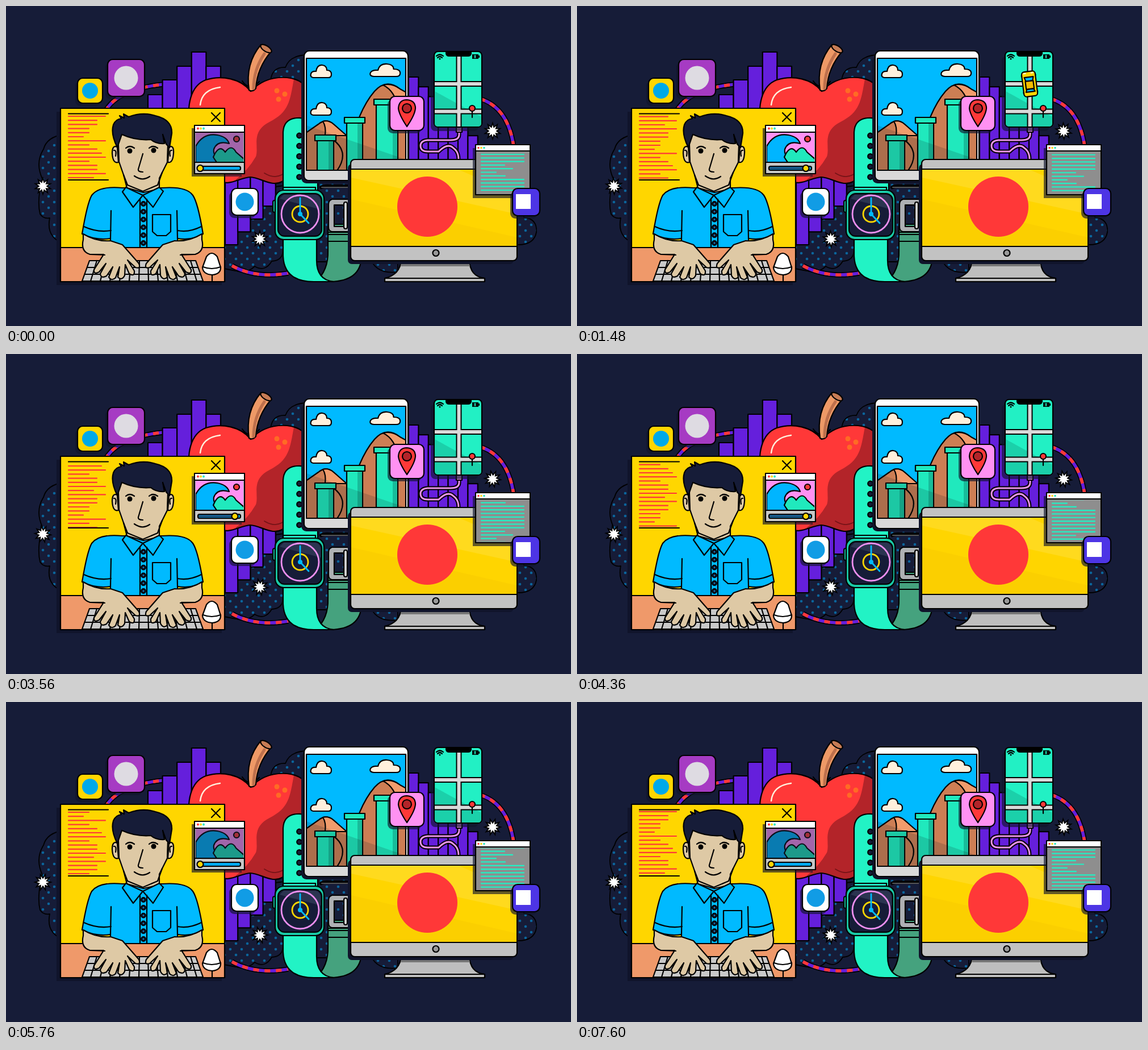
An HTML page for the animation above (7680 ms loop, 995 by 563 pixels).

```html
<!DOCTYPE html>
<html lang="en">
<head>
<meta charset="utf-8">
<title>Desk and devices</title>
<style>
html, body { margin: 0; width: 100%; height: 100%; overflow: hidden; background: #161c38; }
svg { display: block; width: 995px; height: 563px; stroke-linejoin: round; stroke-linecap: round; }
.o { stroke: #000; stroke-width: 2.2; }
.n { fill: none; }
.sh { fill: #10142b; }
</style>
</head>
<body>
<svg viewBox="0 0 995 563" xmlns="http://www.w3.org/2000/svg">
<defs>
  <pattern id="dots" width="20" height="20" patternUnits="userSpaceOnUse">
    <rect width="20" height="20" fill="#161c38"/>
    <circle cx="5" cy="5" r="2.3" fill="#0b659c"/><circle cx="15" cy="15" r="2.3" fill="#0b659c"/>
  </pattern>
  <clipPath id="tabletClip"><rect x="529" y="92" width="175" height="197"/></clipPath>
  <clipPath id="phoneClip"><rect x="755" y="81" width="82" height="131" rx="5"/></clipPath>
  <clipPath id="videoClip"><rect x="334" y="222" width="84" height="53"/></clipPath>
  <clipPath id="codeClip"><rect x="105" y="191" width="78" height="114"/></clipPath>
  <clipPath id="termClip"><rect x="829" y="257" width="92" height="73"/></clipPath>
  <clipPath id="appleClip"><path id="appleShape" d="M431 150C414 128 380 121 352 130C325 140 317 176 325 211C335 249 352 292 375 307C393 318 411 302 430 301C449 302 468 319 486 309C512 294 539 243 544 201C548 157 529 129 495 126C466 124 445 135 431 150Z"/></clipPath>
</defs>
<rect width="995" height="563" fill="#161c38"/>

<!-- clouds -->
<g fill="url(#dots)" stroke="#000" stroke-width="1.8">
  <path d="M102 226Q72 230 66 252Q51 276 64 304Q54 342 60 366Q66 375 77 373Q70 407 102 418Z"/>
  <path d="M384 330L610 300V450H500L488 428Q488 448 468 449Q456 469 438 458Q424 472 405 466L384 462Z"/>
  <path d="M466 132Q468 107 492 108Q500 86 532 86V210H500Z"/>
  <path d="M880 350Q913 358 912 372Q936 374 934 398Q930 420 902 420L880 410Z"/>
  <path d="M640 440Q650 473 690 468V440Z"/>
</g>
<g id="ring" fill="none" stroke-linecap="butt"></g>
<g id="bars" class="o" fill="#651fdc"></g>

<!-- apple -->
<use href="#appleShape" fill="#ff3838"/>
<g clip-path="url(#appleClip)">
  <path d="M550 122H508C500 168 499 186 464 204C430 221 446 248 440 265Q426 289 404 306L433 325H560Z" fill="#b32429"/>
  <path d="M455 294Q479 309 497 287" fill="none" stroke="#751317" stroke-width="1.8"/>
</g>
<use href="#appleShape" fill="none" class="o"/>
<path d="M416 132Q429 151 446 133" class="n o"/>
<path d="M428 148Q421 101 449 68L467 80Q442 109 440 145Q434 152 428 148Z" fill="#ee9966" class="o"/>
<path d="M455 84Q436 112 436 145" class="n" stroke="#be704c" stroke-width="5"/>
<ellipse cx="458" cy="75" rx="11" ry="5" transform="rotate(33 458 75)" fill="#c77c55" class="o"/>
<path d="M342 174Q345 147 377 143" class="n" stroke="#fff0dc" stroke-width="2.5"/>
<g fill="#ff6b24"><circle cx="477" cy="149" r="4.5"/><circle cx="491" cy="155" r="4.5"/><circle cx="480" cy="164" r="4.5"/></g>

<!-- watch strap, upper -->
<path d="M488 326V222Q489 199 512 197Q543 195 549 222V326Z" fill="#22f3c5" class="o"/>
<g id="holes" fill="#161c38" class="o"></g>

<!-- tablet -->
<rect x="520" y="88" width="185" height="224" rx="9" class="sh"/>
<rect x="525" y="79" width="183" height="228" rx="9" fill="#fff" class="o"/>
<path d="M526 289H707V298Q707 306 699 306H534Q526 306 526 298Z" fill="#d9d9d9"/>
<g clip-path="url(#tabletClip)">
  <rect x="529" y="92" width="175" height="197" fill="#00baff"/>
  <path d="M598 292Q612 193 649 150Q670 127 694 146L720 175V292Z" fill="#cd7e54" class="o"/>
  <path d="M664 139Q686 150 690 180L720 190V160L694 146Q680 135 664 139Z" fill="#f19c6c" class="o"/>
  <path d="M510 300V236L550 208Q563 197 577 208L612 240V300Z" fill="#cd7e54" class="o"/>
  <path d="M558 203Q564 212 562 228H600L577 208Q568 200 558 203Z" fill="#f19c6c" class="o"/>
  <path d="M577 236Q606 258 582 291" class="n o"/>
  <g id="pipes" class="o" fill="#20e9bd"></g>
  <path d="M529 210L704 270V290H529Z" fill="#081b24" opacity=".16"/>
  <g id="clouds" fill="#fff0dc" class="o"></g>
</g>
<rect x="529" y="92" width="175" height="197" class="n o"/>

<!-- strap, lower -->
<path d="M567 384H626V441Q625 484 571 485H545Q568 466 567 430Z" fill="#45a27e" class="o"/>
<path d="M567 398H626M567 402H626M567 414H626" class="n o"/>
<path d="M555 319Q560 316 570 317H612" class="n" stroke="#000" stroke-width="6"/>
<path d="M556 319H612" class="n" stroke="#555" stroke-width="2"/>
<path d="M574 340H613V397H574Q568 396 568 389V349Q568 342 574 340ZM578 350V388H604V350Z" fill="#aeb0b3" fill-rule="evenodd" class="o"/>
<rect x="595" y="345" width="6" height="47" rx="3" fill="#d4d4d4" class="o"/>
<path d="M488 410H547V445Q546 482 577 485H544Q490 486 488 440Z" fill="#22f3c5" class="o"/>
<rect x="470" y="342" width="7" height="21" rx="3" fill="#19cda9" class="o"/>
<rect x="474" y="324" width="86" height="87" rx="15" fill="#1ac9a7" class="o"/>
<path d="M488 324H545V319H488Z" fill="#22f3c5" class="o"/>
<rect x="479" y="330" width="77" height="75" rx="12" fill="#161c38" class="o"/>
<path d="M489 332H545Q554 334 554 344V358L482 339Z" fill="#2b3450"/>
<g fill="none" stroke-width="2.8">
  <circle cx="518" cy="366" r="33" stroke="#ed8ff0"/><circle cx="518" cy="366" r="14" stroke="#ffd600"/>
  <path d="M518 338V366L533 382" stroke="#00baff"/>
</g>
<circle cx="518" cy="366" r="4" fill="#00baff"/>

<!-- cable -->
<g fill="none">
  <path id="cable" d="M798 214V226Q798 236 783 236H742Q730 237 730 246Q730 256 743 256H762Q778 240 788 250Q797 256 797 270" stroke="#000" stroke-width="7"/>
  <path id="cableCore" stroke="#eb96e7" stroke-width="3"/>
</g>
<rect x="793" y="211" width="10" height="11" fill="#eb96e7" class="o"/>

<!-- monitor -->
<path d="M696 447H816Q817 476 843 479V485H667V479Q694 473 696 447Z" fill="#bebebe" class="o"/>
<path d="M697 449H815L817 458H695Z" fill="#777"/>
<path d="M667 479H843" class="o"/>
<rect x="602" y="278" width="292" height="176" rx="7" class="sh"/>
<rect x="607" y="270" width="293" height="178" rx="7" fill="#c2c2c2" class="o"/>
<rect x="608" y="287" width="291" height="136" fill="#ffd500"/>
<path d="M608 287H795L899 332V366L608 302Z" fill="#ffe04b" opacity=".4"/>
<path d="M608 340L899 407V423H608Z" fill="#edbd00" opacity=".25"/>
<path d="M608 287H899M608 423H899" class="o"/>
<circle cx="757" cy="434.500" r="5.500" fill="#999" class="o"/>
<circle cx="742" cy="353" r="53" fill="#ff3838"/>

<!-- video call -->
<rect x="89" y="186" width="291" height="305" class="sh"/>
<rect x="96" y="180" width="289" height="305" fill="#ffd600" class="o"/>
<path d="M96 425H385V485H96Z" fill="#ef996a" class="o"/>
<path d="M362 188L377 203M377 188L362 203" class="o"/>
<path d="M110 189.500H180M110 306H180" class="o"/>
<g id="code" clip-path="url(#codeClip)" stroke="#ff3838" stroke-width="2.2"></g>

<path d="M205 320Q164 316 151 333Q143 347 134 401Q158 413 184 409V425H302V409Q329 413 347 401Q338 346 329 333Q318 317 275 320Z" fill="#00baff" class="o"/>
<path d="M184 409L185 360M302 409L301 360M137 388Q161 399 185 395M344 388Q322 399 302 395" class="n o"/>
<path d="M196 248Q187 244 187 259Q188 278 198 275ZM287 248Q296 244 295 259Q294 277 285 275Z" fill="#dec9a5" class="o"/>
<path d="M190 254Q195 253 193 264M292 254Q287 253 289 264" class="n o" stroke-width="1.5"/>
<path d="M197 215H286L284 275L270 303V322L242 328L213 320L207 297L199 274Z" fill="#dec9a5" class="o"/>
<path d="M207 297L214 315L241 326L267 315L275 293" class="n o"/>
<path d="M196 249Q184 225 189 209Q193 199 203 198L200 193L208 197L207 190L216 195Q240 186 263 193Q293 200 292 224L288 249L282 243L276 226L279 242Q264 243 255 235Q228 237 204 226Z" fill="#161c38" class="o"/>
<path d="M211 250Q218 244 226 250M252 250Q259 244 267 250M241 260L233 287Q232 292 241 292M226 299Q240 309 253 300" class="n o"/>
<circle cx="218" cy="255" r="4.500"/><circle cx="260" cy="254" r="4.500"/>
<path d="M211 319L241 333L224 354L205 327ZM270 319L241 333L259 354L277 326Z" fill="#00baff" class="o"/>
<path d="M236 340V425M248 340V425" class="o"/>
<path d="M258 367H290V397L282 404H266L258 397Z" class="n o"/>
<g id="buttons" fill="#161c38"></g>

<path d="M147 448H334L347 484H134Z" fill="#c9c9c9" class="o"/>
<g id="keys" class="o"></g>
<g id="hand" fill="#dec9a5" class="o">
  <path d="M136 411Q131 432 148 437L172 437L155 464Q154 473 164 468L176 453L166 471Q167 480 177 475L188 459L181 477Q186 485 193 478L200 459L197 477Q204 484 209 474L210 455L217 471Q227 477 226 466L214 447L228 460Q238 463 234 453L205 420L184 413Q159 415 136 401Z"/>
  <path d="M148 437L174 438" class="n"/>
</g>
<use href="#hand" transform="matrix(-1 0 0 1 481 0)"/>
<path d="M353 441Q362 429 372 441L378 460Q378 472 363 473Q347 472 346 460Z" fill="#fff" class="o"/>
<path d="M347 459Q362 465 378 459M363 473V484" class="n o"/>

<!-- media player -->
<rect x="327" y="215" width="88" height="85" class="sh" opacity=".65"/>
<rect x="332" y="210" width="88" height="85" fill="#c8c8c8" class="o"/>
<path d="M333 211H419V221H333Z" fill="#fff"/>
<circle cx="338" cy="215.500" r="2" fill="#ff3838"/><circle cx="343" cy="215.500" r="2" fill="#ffd600"/><circle cx="348" cy="215.500" r="2" fill="#20e9bd"/>
<g clip-path="url(#videoClip)">
  <rect x="334" y="222" width="84" height="53" fill="#ff91f2"/>
  <circle cx="406" cy="234" r="5" fill="#ff3838" class="o"/>
  <path d="M334 247Q347 223 372 227Q389 230 393 242Q372 236 366 252Q363 270 395 276H334Z" fill="#00b5ff" class="o"/>
  <path d="M365 266Q375 242 386 257Q397 242 405 257L420 270V278H373Z" fill="#20e9bd" class="o"/>
  <rect id="dim" x="334" y="222" width="84" height="53" fill="#18233c"/>
</g>
<path d="M333 222H419M333 275H419" class="o"/>
<rect x="338" y="282" width="75" height="7" rx="3" fill="#00a9ee" class="o"/>
<path id="played" stroke="#1b4d78" stroke-width="4"/>
<circle id="knob" cy="285.500" r="5.500" fill="#ffd600" class="o"/>

<!-- phone -->
<rect x="748" y="88" width="84" height="132" rx="8" class="sh" opacity=".65"/>
<rect x="754" y="80" width="84" height="133" rx="7" fill="#22f0c4" class="o"/>
<g clip-path="url(#phoneClip)">
  <path d="M755 150L837 195V213H755Z" fill="#1bd0aa"/>
  <path d="M754 137H838M754 185.500H838M797.500 80V213" stroke="#000" stroke-width="10" stroke-linecap="butt"/>
  <path d="M754 137H838M754 185.500H838M797.500 80V213" stroke="#d9d9d9" stroke-width="6" stroke-linecap="butt"/>
  <g id="car">
    <path d="M-9 -15H9M-9 15H9" stroke="#000" stroke-width="9"/>
    <rect x="-12" y="-22" width="24" height="44" rx="5" fill="#ffd600" class="o"/>
    <path d="M-8 -12H8L6 -5H-6ZM-6 9H6L8 14H-8Z" fill="#00baff" class="o"/>
    <rect x="-7" y="-5" width="14" height="14" fill="#f4bd00" class="o"/>
    <path d="M-8 -19H-5M5 -19H8" stroke="#fff" stroke-width="2"/>
  </g>
  <path d="M774 80H820V84Q819 89 814 89H780Q775 89 774 84Z"/>
</g>
<path d="M821 181V196" class="o"/><circle cx="821" cy="180" r="5" fill="#ff3838" class="o"/>
<path d="M758 88Q764 83 770 88M760 91Q764 87 768 91" class="n o"/><circle cx="764" cy="93" r="1.500"/>
<path d="M821 85H832V93H821ZM832 87H834V91H832Z"/><path d="M826 87V91" stroke="#22f0c4" stroke-width="2"/>

<!-- terminal -->
<rect x="822" y="250" width="95" height="88" class="sh" opacity=".65"/>
<rect x="827" y="244" width="96" height="88" fill="#8e8e8e" class="o"/>
<path d="M828 245H922V254H828Z" fill="#fff"/><path d="M828 255H922" class="o"/>
<circle cx="832" cy="249.500" r="1.700" fill="#ff3838"/><circle cx="837" cy="249.500" r="1.700" fill="#ffd600"/><circle cx="842" cy="249.500" r="1.700" fill="#20e9bd"/>
<g id="term" clip-path="url(#termClip)" stroke="#22f0c4" stroke-width="2.2"></g>

<g id="tiles"></g>
<path d="M706 212Q692 191 691 180Q692 165 706 165Q721 166 721 180Q720 192 706 212Z" fill="#ff3838" class="o"/>
<circle cx="706" cy="180" r="8" fill="#b32429" class="o"/>
<g id="stars"></g>
</svg>
<script>
const LOOP = 7680, STEP = 40;
const $ = id => document.getElementById(id);
const fill = (id, list, make) => { $(id).innerHTML = list.map(make).join(''); };
const range = n => [...Array(n).keys()];

$('cableCore').setAttribute('d', $('cable').getAttribute('d'));
fill('ring', ['M168 205Q178 148 276 138', 'M834 163Q884 178 894 247', 'M398 457Q440 480 497 470'], d =>
  `<path d="${d}" stroke="#000" stroke-width="9"/><path d="${d}" stroke="#651fdc" stroke-width="5.5"/>
   <path d="${d}" stroke="#ff3838" stroke-width="5.5" stroke-dasharray="10 10"/>`);

const bars = [
  ...[156, 130, 106, 81, 106].map((y, i) => [250 + i * 25.6, y, 25.6, 210 - y]),
  ...range(4).map(i => [386 + i * 22.2, 290, 22.2, 130 - i * 22.6]),
  ...range(7).map(i => [709 + i * 17.4, 125 + i * 17.2, 17.4, 150 - i * 17.2])
];
fill('bars', bars, ([x, y, w, h]) => `<rect x="${x}" y="${y}" width="${w}" height="${h}"/>`);
fill('holes', range(5), i => `<circle cx="516.5" cy="${228 + i * 18.2}" r="4.3"/>`);
fill('pipes', [[544, 227, 37], [596, 196, 36], [648, 164, 46]], ([x, y, w]) =>
  `<rect x="${x + 4}" y="${y + 9}" width="${w - 8}" height="140"/>
   <path d="M${x + w - 13} ${y + 10}h8v140h-8z" fill="#18bc9a" stroke="none"/>
   <rect x="${x}" y="${y}" width="${w}" height="10"/>`);
fill('clouds', [[537, 126, 1], [642, 124, 1.45], [537, 192, 1]], ([x, y, s]) =>
  `<path transform="translate(${x} ${y}) scale(${s} 1)" vector-effect="non-scaling-stroke"
    d="M4 0Q-2-1 0-7Q2-12 9-11Q11-23 20-22Q28-21 28-13Q36-13 36-6Q36 0 31 0Z"/>`);
fill('buttons', range(6), i => `<circle cx="242" cy="${348 + i * 13.8}" r="3.8" class="o"/><circle cx="242" cy="${348 + i * 13.8}" r="1" fill="#00baff"/>`);
fill('keys', range(12), i =>
  `<path d="M${160 + i * 15} 448L${149 + i * 17} 484"/>` +
  (i < 2 ? `<path d="M${143 - i * 4} ${460 + i * 12}H${338 + i * 5}"/>` : ''));

// id, x, y, size, tile colour, inner mark
const tiles = [
  ['dotTile', 126, 127, 44, '#ffd600', '<circle r="14" fill="#00a9e8"/>'],
  ['rideTile', 179, 94, 65, '#a63bc3', '<circle r="21" fill="#dedbe2"/>'],
  ['pinTile', 676, 159, 60, '#ff91f2', ''],
  ['chatTile', 397, 321, 47, '#fff', '<circle r="16" fill="#119ce5"/>'],
  ['codeTile', 892, 321, 48, '#4d35e5', '<rect x="-18" y="-14" width="26" height="26" fill="#fff"/>']
];
fill('tiles', tiles, ([id, x, y, s, color, mark]) =>
  `<rect x="${x - 4}" y="${y + 5}" width="${s}" height="${s}" rx="9" class="sh" opacity=".65"/>
   <g transform="translate(${x + s / 2} ${y + s / 2})"><g id="${id}">
   <rect x="${-s / 2}" y="${-s / 2}" width="${s}" height="${s}" rx="9" fill="${color}" class="o"/>${mark}</g></g>`);

const starPath = (outer, inner) => 'M' + range(20).map(i => {
  const a = i * Math.PI / 10, r = i % 2 ? inner : outer;
  return (r * Math.sin(a)).toFixed(2) + ' ' + (-r * Math.cos(a)).toFixed(2);
}).join('L') + 'Z';
fill('stars', [[65, 317], [447, 410], [857, 220]], ([x, y]) =>
  `<g transform="translate(${x} ${y})"><g class="star"><path d="${starPath(17, 9)}"/><path d="${starPath(11, 5.5)}" fill="#fff"/></g></g>`);

const lineSet = (id, x, top, gap, ends) => {
  const span = gap * ends.length;
  const rows = ends.map((end, i) => `<path d="M${x} ${top + i * gap}H${end}"/>`).join('');
  $(id).innerHTML = `<g>${rows}<g transform="translate(0 ${-span})">${rows}</g></g>`;
  return p => $(id).firstChild.setAttribute('transform', `translate(0 ${p * span})`);
};
const scrollCode = lineSet('code', 110, 194, 7.2,
  [175, 160, 160, 146, 146, 136, 175, 146, 160, 168, 175, 146, 160, 160, 175, 154]);
const scrollTerm = lineSet('term', 837, 261, 6.3,
  [912, 912, 912, 878, 892, 863, 879, 912, 912, 912, 912]);

// smooth value between [time, value] keys
function track(t, keys) {
  if (t <= keys[0][0]) return keys[0][1];
  for (let i = 1; i < keys.length; i++) {
    const [t0, a] = keys[i - 1], [t1, b] = keys[i];
    if (t < t1) {
      const p = (t - t0) / (t1 - t0);
      return a + (b - a) * p * p * (3 - 2 * p);
    }
  }
  return keys[keys.length - 1][1];
}
const press = (id, t, at) => {
  const s = track(t, [[at, 1], [at + 200, .93], [at + 400, 1]]);
  $(id).setAttribute('transform', `scale(${s})`);
};

function draw(now) {
  const t = Math.min(Math.floor((now % LOOP) / STEP) * STEP, LOOP - 80);
  const p = t / LOOP;
  scrollCode(p);
  scrollTerm(p);
  document.querySelectorAll('.star').forEach(s => s.setAttribute('transform', `rotate(${p * 360})`));

  const knob = track(t, [[320, 342], [1400, 403], [4400, 403], [5560, 342]]);
  $('knob').setAttribute('cx', knob);
  $('played').setAttribute('d', `M341 285.5H${knob}`);
  const light = Math.max(0, Math.min(1, (knob - 360) / 30));
  $('dim').setAttribute('opacity', .4 * (1 - light));

  const x = track(t, [[2340, 797], [3280, 727]]);
  const y = track(t, [[160, 239], [1320, 137]]);
  const turn = track(t, [[1320, 0], [2240, -90]]);
  $('car').setAttribute('transform', `translate(${x} ${y}) rotate(${turn})`);

  press('dotTile', t, 3600);
  press('rideTile', t, 4640);
}
const start = performance.now();
function tick() {
  draw(performance.now() - start);
  requestAnimationFrame(tick);
}
tick();
</script>
</body>
</html>
```
